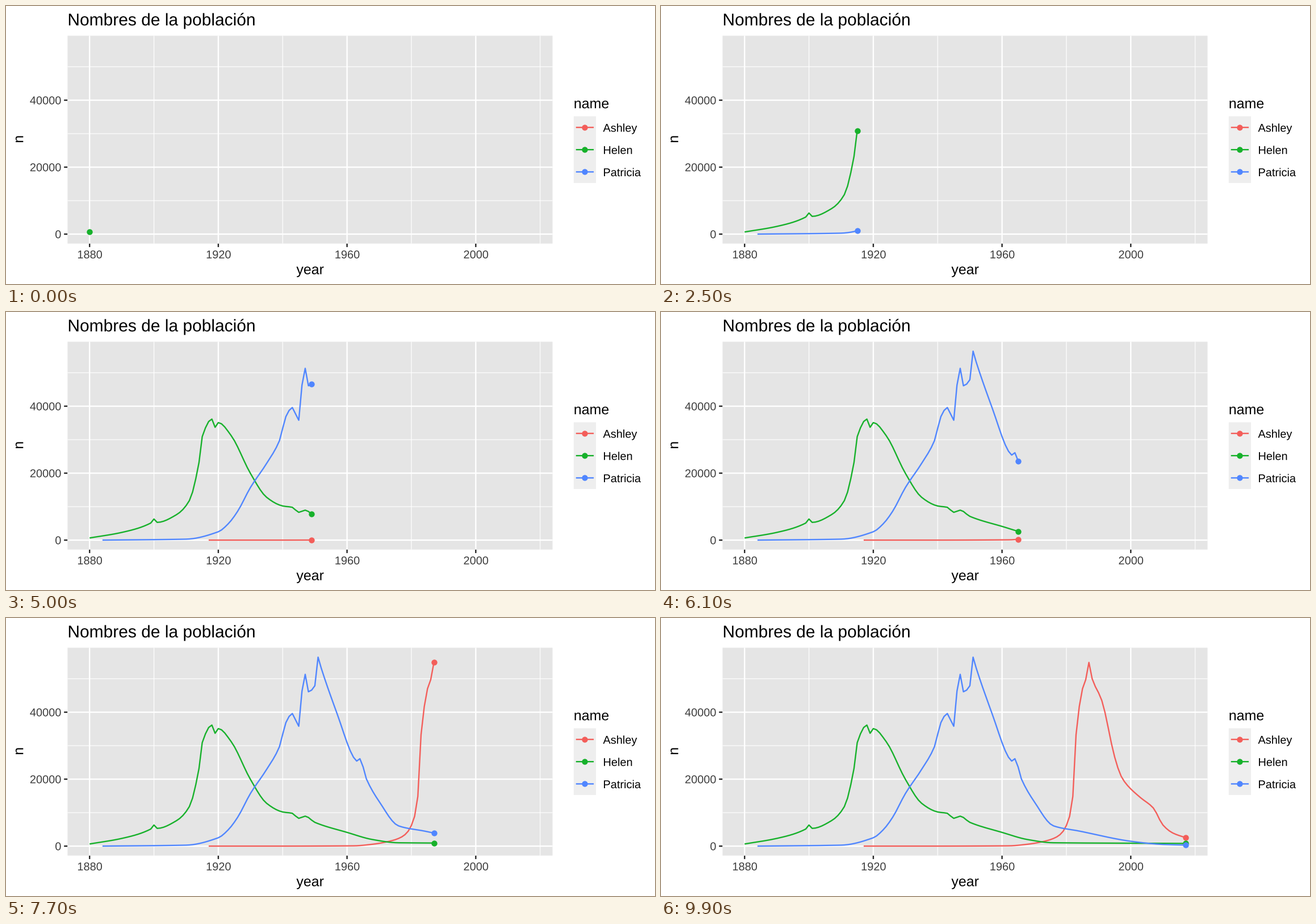
Recreate the animation shown at these times as a matplotlib script. Size 1143 by 490 pixels, loop 10000 ms.

```python
import numpy as np
import matplotlib.pyplot as plt
from matplotlib.animation import FuncAnimation
from matplotlib.patches import PathPatch, Rectangle
from matplotlib.textpath import TextPath
from matplotlib.transforms import Affine2D

W, H, DPI = 1143, 490, 100
FRAMES, STEP = 100, 100
FIRST, LAST = 1880, 2017
LEFT, RIGHT, TOP, BOTTOM = 108.4, 962.5, 52.4, 418.7
LOW, HIGH = 0.005, 56.43          # thousands
PT = 72 / DPI                     # one pixel in points
THICK, THIN, DOT = 2.4, 1.2, 10.4
SMALL, MEDIUM, LARGE = 19.96, 24.95, 29.94
RED, GREEN, BLUE = "#F35E5A", "#17B12B", "#5086FF"

# A high kerning factor switches pair kerning off.
plt.rcParams.update({"font.family": "Liberation Sans", "text.kerning_factor": 6})

# Key points of each curve: (year, thousands).
ASHLEY = [(1917, 0.005), (1938, 0.005), (1962, 0.09), (1968, 0.57),
          (1974, 1.65), (1977, 2.75), (1979, 4.45), (1981, 8.9),
          (1982, 14.85), (1983, 33.3), (1985, 47), (1986, 49.7),
          (1987, 54.86), (1988, 50), (1991, 43.5), (1995, 26.6),
          (1997, 20.9), (1999, 18.1), (2003, 14.5), (2007, 11.4),
          (2010, 6.3), (2013, 3.95), (2017, 2.53)]
HELEN = [(1880, 0.64), (1890, 2.3), (1899, 5.1), (1900, 6.3), (1901, 5.3),
         (1907, 7.6), (1911, 11.8), (1914, 23.2), (1915, 30.9),
         (1918, 36.15), (1919, 33.7), (1920, 35.1), (1924, 31.2),
         (1930, 19.9), (1935, 12.8), (1940, 10.2), (1943, 9.8),
         (1945, 8.3), (1947, 8.95), (1950, 7.1), (1960, 4.1),
         (1968, 1.95), (1976, 1), (2017, 0.8)]
PATRICIA = [(1884, 0.006), (1910, 0.29), (1920, 2.5), (1923, 4.8),
            (1926, 8.6), (1930, 15.75), (1935, 22.9), (1939, 29.7),
            (1941, 36.9), (1943, 39.6), (1945, 35.8), (1946, 46.3),
            (1947, 51.3), (1948, 46.1), (1950, 47.9), (1951, 56.43),
            (1952, 53.1), (1957, 39.3), (1962, 26.55), (1963, 25.4),
            (1964, 26.1), (1966, 20.1), (1970, 13.3), (1976, 6.05),
            (1984, 4.5), (2000, 1.45), (2010, 0.5), (2017, 0.3)]


def smooth(points, x):
    """Monotone cubic curve through the points."""
    px_, py_ = np.array(points, float).T
    h = np.diff(px_)
    d = np.diff(py_) / h
    slope = np.concatenate([d[:1], np.zeros(len(d) - 1), d[-1:]])
    for i in range(1, len(d)):
        if d[i - 1] * d[i] > 0:
            slope[i] = 2 * d[i - 1] * d[i] / (d[i - 1] + d[i])
    i = np.clip(np.searchsorted(px_, x, side="right") - 1, 0, len(h) - 1)
    t = (x - px_[i]) / h[i]
    ease = t * t * (3 - 2 * t)
    return (py_[i] + (py_[i + 1] - py_[i]) * ease
            + h[i] * t * (1 - t) * (slope[i] * (1 - t) - slope[i + 1] * t))


def px(year):
    unit = (RIGHT - LEFT) / ((LAST - FIRST) * 1.1)
    return LEFT + (year - FIRST + (LAST - FIRST) * 0.05) * unit


def py(n):
    span = HIGH - LOW
    return BOTTOM - (n - LOW + span * 0.05) * (BOTTOM - TOP) / (span * 1.1)


def dot(x, y, color):
    return ax.plot(x, y, "o", color=color, ms=DOT * PT, mew=0,
                   snap=False, zorder=5)[0]


class Series:
    def __init__(self, name, color, points, gap=()):
        self.name, self.color = name, color
        years = np.array([y for y in range(points[0][0], LAST + 1) if y not in gap])
        self.x, self.y = px(years), py(smooth(points, years))
        # Every year belongs to the nearest animation step.
        self.step = np.rint((years - FIRST) * (FRAMES - 1) / (LAST - FIRST))
        self.line, = ax.plot([], [], color=color, lw=THICK * PT, zorder=4,
                             solid_capstyle="butt", solid_joinstyle="round")
        self.dot = dot([], [], color)

    def show(self, k):
        count = int(np.searchsorted(self.step, k, side="right"))
        xs, ys = self.x[:count], self.y[:count]
        if 0 < count < len(self.x) and self.step[count - 1] < k:
            before, after = self.step[count - 1:count + 1]
            t = (k - before) / (after - before)
            xs = np.append(xs, xs[-1] + t * (self.x[count] - xs[-1]))
            ys = np.append(ys, ys[-1] + t * (self.y[count] - ys[-1]))
        self.line.set_data(xs, ys)
        self.dot.set_data(xs[-1:], ys[-1:])
        return self.line, self.dot


def rect(x, y, w, h, color):
    ax.add_patch(Rectangle((x, y), w, h, fc=color, ec="none", snap=False, zorder=1))


def rule(xs, ys, color, width, z=2):
    ax.plot(xs, ys, color=color, lw=width * PT, solid_capstyle="butt",
            snap=False, zorder=z)


def label(x, y, text, size, color="black", align=0.0, turn=0):
    """Text on a baseline; align 0 is left, 0.5 centre, 1 right."""
    path = TextPath((0, 0), text, size=size)
    place = Affine2D().translate(-align * path.get_extents().x1, 0)
    place.scale(1, -1).rotate_deg(turn).translate(x, y)
    ax.add_patch(PathPatch(place.transform_path(path), fc=color, ec="none",
                           snap=False, zorder=6))


def draw_panel():
    rect(LEFT, TOP, RIGHT - LEFT, BOTTOM - TOP, "#E5E5E5")
    for n in (10, 30, 50):
        rule([LEFT, RIGHT], [py(n)] * 2, "white", THIN)
    for year in range(1900, 2021, 40):
        rule([px(year)] * 2, [TOP, BOTTOM], "white", THIN)
    for n in (0, 20, 40):
        y = py(n)
        rule([LEFT, RIGHT], [y, y], "white", THICK, 3)
        rule([LEFT - 6.2, LEFT], [y, y], "#262626", THICK)
        label(96.6, y + 7.2, str(n * 1000), SMALL, "#3D3D3D", 1)
    for year in range(1880, 2001, 40):
        x = px(year)
        rule([x, x], [TOP, BOTTOM], "white", THICK, 3)
        rule([x, x], [BOTTOM, BOTTOM + 6.2], "#262626", THICK)
        label(x, 444.8, str(year), SMALL, "#3D3D3D", 0.5)
    label(LEFT, 34.2, "Nombres de la población", LARGE)
    label((LEFT + RIGHT) / 2, 472.7, "year", MEDIUM, align=0.5)
    label(30.3, (TOP + BOTTOM) / 2, "n", MEDIUM, align=0.5, turn=-90)


def draw_legend():
    x, y, key = 999.85, 194.4, 39.2
    label(x, 180.2, "name", MEDIUM)
    rect(x, y, key, key * 3, "#EEEEEE")
    for i, s in enumerate(series):
        mid = y + key * (i + 0.5)
        rule([x + key * 0.1, x + key * 0.9], [mid, mid], s.color, THICK)
        dot([x + key / 2], [mid], s.color)
        label(1051.5, mid + 7.6, s.name, SMALL)


fig = plt.figure(figsize=(W / DPI, H / DPI), dpi=DPI, facecolor="white")
ax = fig.add_axes([0, 0, 1, 1])
ax.set(xlim=(0, W), ylim=(H, 0))
ax.set_autoscale_on(False)
ax.axis("off")

series = [
    Series("Ashley", RED, ASHLEY, gap=range(1918, 1938)),
    Series("Helen", GREEN, HELEN),
    Series("Patricia", BLUE, PATRICIA),
]
draw_panel()
draw_legend()


def update(k):
    return [artist for s in series for artist in s.show(k)]


anim = FuncAnimation(fig, update, frames=FRAMES, init_func=lambda: update(0),
                     interval=STEP, repeat=True, repeat_delay=0, blit=False)
plt.show()
```
